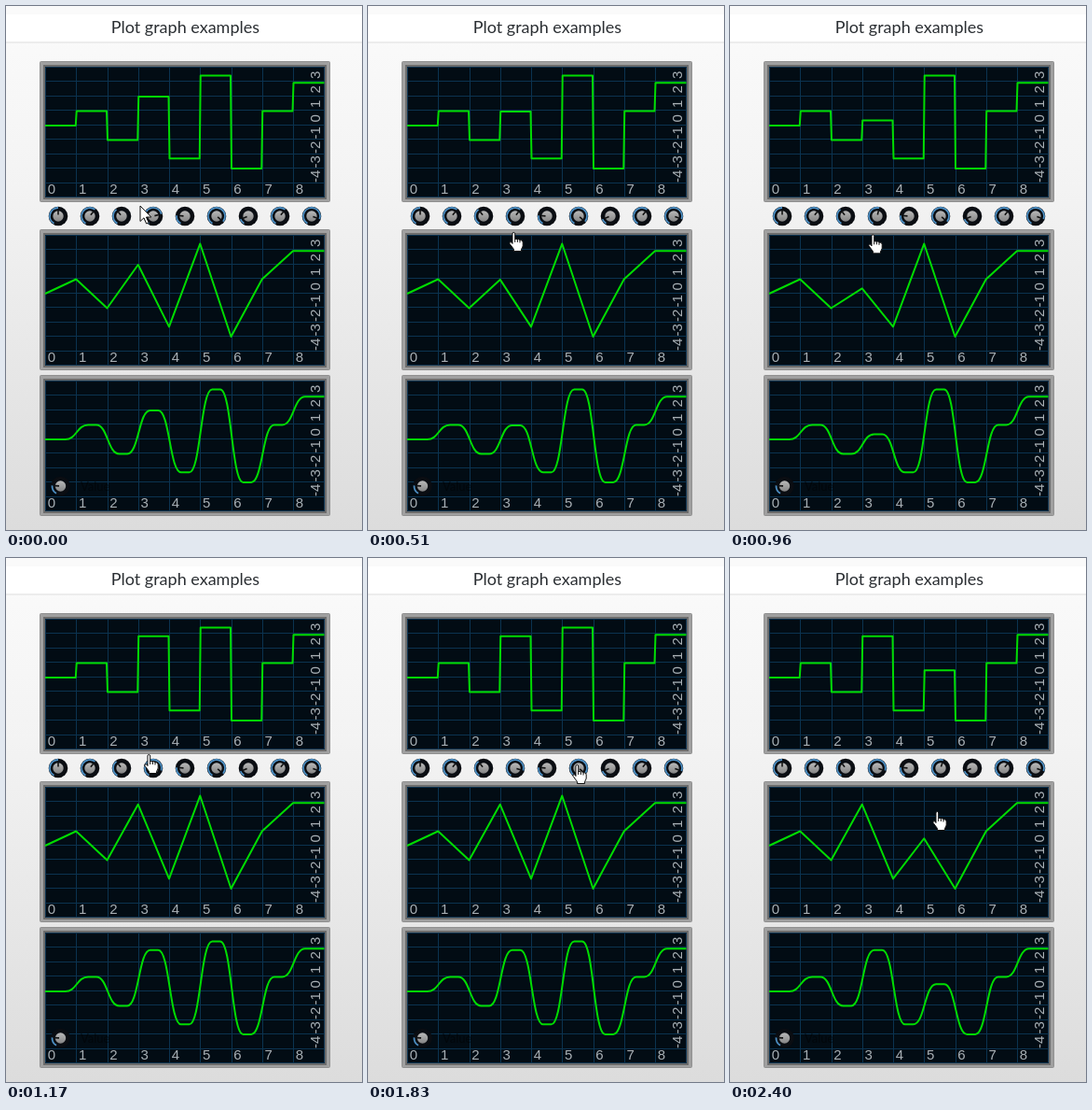
Animation of 382 by 561 pixels, one loop 2.43 s. Source, as an HTML page:

```html
<!DOCTYPE html>
<html lang="en">
<head>
<meta charset="utf-8">
<title>Plot graph examples</title>
<style>
  html, body { margin: 0; width: 100%; height: 100%; overflow: hidden; }
  svg { display: block; width: 100vw; height: 100vh; }
  .title { font: 18px Lato, sans-serif; fill: #2b2f33; text-anchor: middle; }
  .axis { font: 15px "Liberation Sans", Arial, sans-serif; fill: #a9b0b5; }
  .side { text-anchor: middle; }
  .faint { font: 13px Lato, sans-serif; opacity: .5; }
  .grid { stroke: #0b3350; fill: none; }
  .line { stroke: #00dc00; stroke-width: 2; fill: none; stroke-linejoin: round; }
  .pointer { fill: #fff; stroke: #111; stroke-linejoin: round; }
</style>
</head>
<body>
<svg id="stage" viewBox="0 0 382 561">
  <defs>
    <linearGradient id="page" x2="0" y2="1">
      <stop stop-color="#fbfbfb"/><stop offset=".35" stop-color="#f3f3f3"/><stop offset="1" stop-color="#dcdcdc"/>
    </linearGradient>
    <linearGradient id="cap" x2="0" y2="1">
      <stop stop-color="#b8b8b8"/><stop offset="1" stop-color="#858585"/>
    </linearGradient>
  </defs>
  <rect width="382" height="561" fill="url(#page)"/>
  <rect width="382" height="38" fill="#fff"/>
  <rect width="382" height="9" fill="#fafafa"/>
  <rect y="38" width="382" height="2" fill="#ececec"/>
  <text class="title" x="192.4" y="29">Plot graph examples</text>
</svg>
<script>
const LOOP = 2430, TICK = 30;
const LEFT = 42, STEP = 33.25, ZERO = 128, UNIT = 15.5, RIGHT = 341.5;
const values = [0, 1, -1, 2, -2.28, 3.45, -2.97, 1, 2.95];

const svg = document.getElementById('stage');

function add(parent, tag, attrs, text) {
  const el = document.createElementNS('http://www.w3.org/2000/svg', tag);
  for (const key in attrs) el.setAttribute(key, attrs[key]);
  if (text !== undefined) el.textContent = text;
  return parent.appendChild(el);
}

// Smooth 0 to 1 between two times
function ease(t, from, to) {
  const p = Math.min(1, Math.max(0, (t - from) / (to - from)));
  return p * p * (3 - 2 * p);
}

const px = k => LEFT + STEP * k;
const py = v => ZERO - UNIT * v;

const shapes = {
  steps: v => 'M' + v.map((y, k) => `${px(k) + (k ? .5 : 0)} ${py(y)}H${k < 8 ? px(k + 1) - .5 : RIGHT}`).join('L'),
  peaks: v => 'M' + v.map((y, k) => `${px(k)} ${py(y)}`).join('L') + 'H' + RIGHT,
  smooth: v => `M${LEFT} ${py(v[0])}` + v.slice(1).map((y, i) => {
    const k = i + 1.02, from = py(v[i]), to = py(y);
    return `H${px(k - .37)}C${px(k)} ${from} ${px(k)} ${to} ${px(k + .37)} ${to}`;
  }).join('') + 'H' + RIGHT
};

function makePlot(dy, shape) {
  const g = add(svg, 'g', { transform: `translate(0 ${dy})` });
  add(g, 'rect', { x: 36.5, y: 59.5, width: 311, height: 150, rx: 1, fill: '#a0a0a0', stroke: '#909090' });
  add(g, 'rect', { x: 41, y: 64, width: 302, height: 142, fill: '#020c14', stroke: '#6c6c6c', 'stroke-width': 2 });
  let d = 'M42.5 65.5H341.5V204.5H42.5Z';
  for (let k = 1; k < 9; k++) d += `M${Math.round(px(k)) + .5} 65V205`;
  for (let v = -4; v <= 3; v++) d += `M42 ${Math.floor(py(v)) - .5}H342`;
  add(g, 'path', { class: 'grid', d });
  const under = add(g, 'g', {});
  for (let k = 0; k < 9; k++) add(g, 'text', { class: 'axis', x: px(k) + 2.8, y: 201 }, k);
  for (let v = -4; v <= 3; v++) {
    add(g, 'text', { class: 'axis side', transform: `translate(337 ${py(v) - 7.7}) rotate(-90)` }, v);
  }
  const line = add(g, 'path', { class: 'line' });
  return { under, draw: v => line.setAttribute('d', shape(v)) };
}

function makeKnob(parent, x, y) {
  const g = add(parent, 'g', { transform: `translate(${x} ${y})` });
  add(g, 'circle', { r: 10.3, fill: '#0a0d12' });
  const arc = add(g, 'path', { fill: 'none', stroke: '#4c8fc4', 'stroke-width': 1.8 });
  add(g, 'circle', { r: 5.7, fill: 'url(#cap)' });
  const mark = add(g, 'path', { d: 'M0 -6V-1.5', stroke: '#111', 'stroke-width': 1.6 });
  const at = deg => {
    const a = deg * Math.PI / 180;
    return `${9 * Math.sin(a)} ${-9 * Math.cos(a)}`;
  };
  return v => {
    const deg = v * 37.5;
    arc.setAttribute('d', `M${at(-150)}A9 9 0 ${deg > 30 ? 1 : 0} 1 ${at(deg)}`);
    mark.setAttribute('transform', `rotate(${deg})`);
  };
}

const plots = [makePlot(0, shapes.steps), makePlot(180, shapes.peaks), makePlot(336, shapes.smooth)];
makeKnob(plots[2].under, 58.5, 178)(-2.3);
add(plots[2].under, 'text', { class: 'faint', x: 80, y: 183 }, 'Value');

const knobX = k => 56 + 34 * k;
const knobs = values.map((v, k) => makeKnob(svg, knobX(k), 225));

const arrow = add(svg, 'path', { class: 'pointer', d: 'M0 0V16.5L4 12.8 6.6 19 9.2 18 6.5 12H11.8Z' });
const hand = add(svg, 'path', {
  class: 'pointer',
  d: 'M4 2Q4 .5 5.3 .5T6.7 2V8Q8 6.5 9.3 8.2 11 7 12 8.8 15 8 15.2 11V15Q14.5 17 13.5 18.5V20.5H5.5V18.5L1 12.5Q.5 10 2.5 10.7L4 12.5ZM6.7 8V11M9.4 8.2V11M12 8.8V11.5'
});

function cursorAt(t) {
  const press = ease(t, 0, 120), rise = ease(t, 875, 1170);
  const travel = ease(t, 1290, 1640), back = ease(t, 1690, 1820), drag = ease(t, 1830, 2140);
  return [
    144 + 12 * press - 3 * ease(t, 500, 960) + 105 * travel - 34 * back - 2 * drag,
    214 + 9 * press + 30 * ease(t, 210, 720) - 43 * rise + 12 * travel - back + 50 * drag
  ];
}

function render(time) {
  const t = Math.floor(time % LOOP / TICK) * TICK;
  values[3] = 2 - 2 * ease(t, 210, 800) + 2.85 * ease(t, 900, 1170);
  values[5] = 3.45 - 2.95 * ease(t, 1830, 2140);
  plots.forEach(p => p.draw(values));
  knobs.forEach((set, k) => set(values[k]));

  const [x, y] = cursorAt(t);
  const dragging = t >= 210 && t < 1290 || t >= 1830;
  const over = values.some((v, k) => Math.hypot(x - knobX(k), y - 225) < 11);
  const useHand = dragging || over;
  hand.setAttribute('visibility', useHand ? 'visible' : 'hidden');
  arrow.setAttribute('visibility', useHand ? 'hidden' : 'visible');
  hand.setAttribute('transform', `translate(${x - 5} ${y})`);
  arrow.setAttribute('transform', `translate(${x} ${y})`);
}

const start = performance.now();
function frame() {
  render(performance.now() - start);
  requestAnimationFrame(frame);
}
frame();
</script>
</body>
</html>
```
